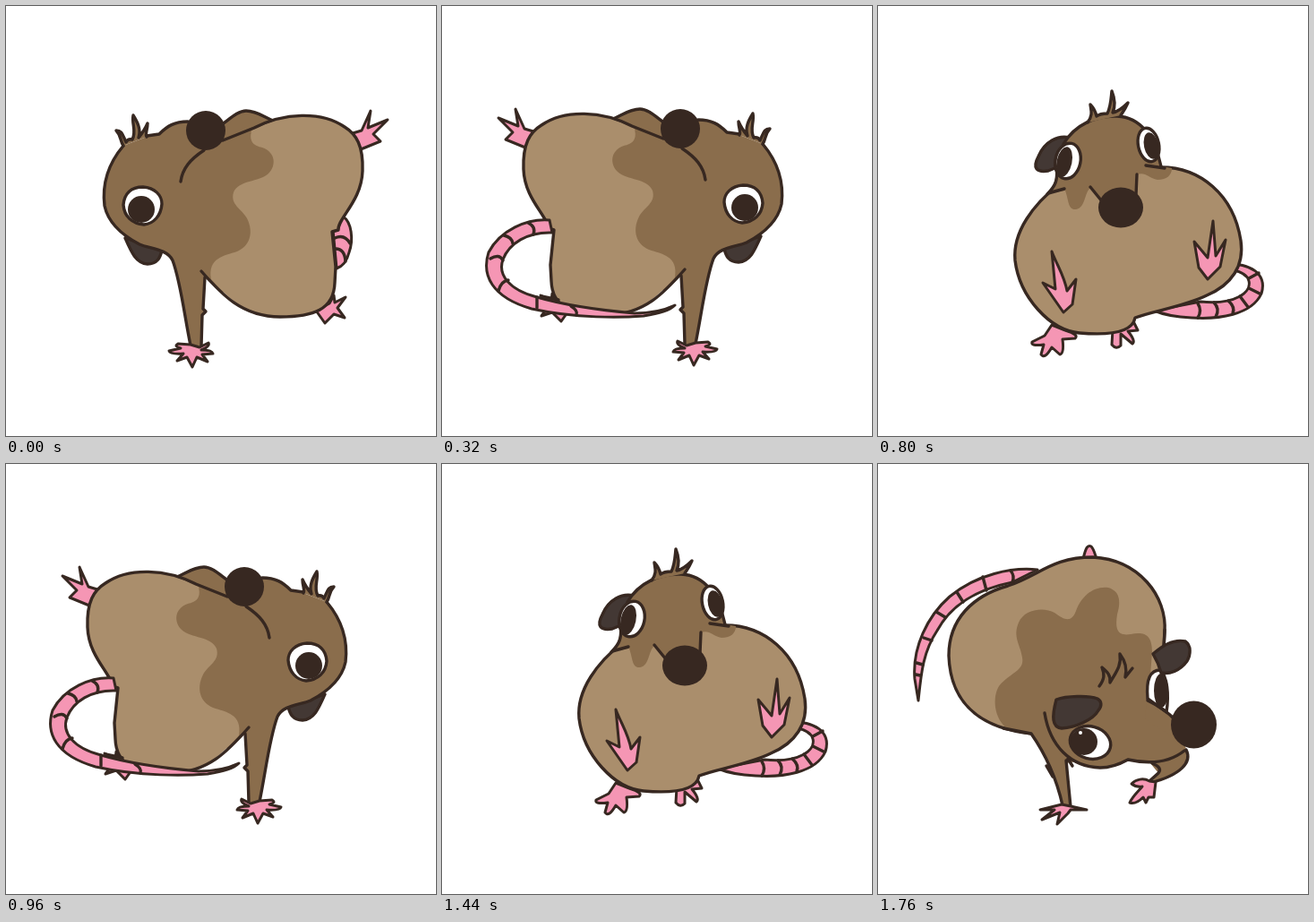
An HTML page that plays this animation: 480 px wide and 480 px high, repeating every 1.92 s.

```html
<!DOCTYPE html>
<html lang="en">
<head>
<meta charset="utf-8">
<title>Spinning rat</title>
<style>
html, body { margin: 0; width: 100%; height: 100%; overflow: hidden; background: #fff; }
svg { display: block; width: 100%; height: 100%; }
.pose { visibility: hidden; }
.line, .fur, .belly, .pink, .ear, .white { stroke: #372821; stroke-width: 3.4; stroke-linejoin: round; stroke-linecap: round; }
.line { fill: none; }
.fur { fill: #8a6d4c; }
.belly { fill: #aa8e6c; }
.pink { fill: #f596b4; stroke-width: 3; }
.ear { fill: #433834; }
.white { fill: #fff; }
.dark { fill: #372821; }
.flat { stroke: none; }
</style>
</head>
<body>
<svg viewBox="0 0 480 480">
<defs>
  <g id="side">
    <path class="pink" d="M387 142L397 139L407 117L404 136L426 127L410 143L418 151L396 160Z"/>
    <path class="pink" d="M346 340L361 332L366 323L367 331L379 325L370 337L378 348L366 344L356 354Z"/>
    <path class="ear" d="M133 259C140 275 145 287 158 288C169 288 172 281 174 273Z"/>
    <path class="fur" d="M240 133C250 126 259 117 268 117C280 117 288 124 298 128L262 152L223 158Z"/>
    <path class="fur flat" d="M131 156C115 175 107 198 110 223C114 242 130 256 149 266C160 271 180 271 186 284C195 308 199 345 206 379L218 380L219 345L223 341L220 338L222 303L240 320L325 300L325 130L245 149L223 139L203 129C188 129 180 134 171 143L157 146Z"/>
    <path class="belly flat" d="M274 139C271 152 277 156 286 158C301 163 302 178 293 187C282 197 260 194 254 208C250 222 263 226 269 237C277 253 272 268 258 274C243 279 225 281 229 305C250 328 270 347 306 347C343 347 366 339 367 309L368 291L364 252L371 250C370 237 397 218 398 184C399 156 391 143 378 135C352 117 310 119 274 139Z"/>
    <path class="line" d="M218 296C240 321 263 347 306 347C343 347 366 339 367 309L368 291L364 252L371 250C370 237 397 218 398 184C399 156 391 143 378 135C352 117 310 119 277 136L242 150"/>
    <path class="line" d="M131 156C115 175 107 198 110 223C114 242 130 256 149 266C160 271 180 271 186 284C195 308 199 345 206 379M222 303L220 338L223 341L219 345L218 380M203 129C188 129 180 134 171 143L157 145M221 161C206 171 197 181 195 196"/>
    <path class="fur" d="M131 156C127 150 129 145 123 139C130 139 130 144 134 152Q136 148 141 149C146 140 140 131 142 122C147 130 151 138 148 147C152 142 155 138 158 131C158 138 155 143 157 146"/>
    <path class="pink" d="M206 378L192 377Q187 380 195 382L182 385Q183 389 198 388L191 396L202 392L208 403L213 392L225 397L219 389L231 388Q230 384 218 384Q228 380 226 376L216 381Z"/>
    <path class="white" d="M131 222C132 210 139 202 153 202C166 203 174 211 174 221C173 234 165 243 154 244C141 243 132 235 131 222Z"/>
    <circle class="dark" cx="151" cy="227" r="15"/>
    <circle class="dark" cx="223" cy="139" r="22"/>
  </g>
</defs>

<g class="pose">
  <path class="pink" d="M376 235C386 241 388 261 383 275C380 287 375 291 369 293L365 250Z"/>
  <path class="line" d="M367 259Q378 254 384 265M368 271Q378 271 379 285"/>
  <use href="#side"/>
</g>

<g class="pose">
  <path class="pink" d="M282 349L262 361L261 378Q266 384 271 379L271 366L284 377Q288 374 279 363L290 362L286 354Z"/>
  <path class="pink" d="M194 356L186 368L172 375Q170 380 185 378L182 389Q186 395 194 381L203 389Q208 388 206 372L220 371Q225 367 209 362Z"/>
  <path class="pink" d="M398 288C425 291 433 305 428 321C417 345 380 350 350 348C330 347 315 343 308 340L360 330C400 334 417 319 414 307C412 299 402 296 396 295Z"/>
  <path class="line" d="M414 304L425 298M414 315L426 321M404 324L413 336M391 329Q399 336 396 343M375 331Q382 338 377 347M357 332Q362 340 357 348"/>
  <path class="ear" d="M214 147C201 144 186 151 179 168C172 181 177 186 190 184L207 177Z"/>
  <path class="belly" d="M202 199C174 221 150 252 153 284C158 325 192 362 225 365C260 368 284 364 287 348C308 340 340 336 367 323C395 311 409 290 405 262C397 210 359 180 316 180Z"/>
  <path class="fur flat" d="M190 209C202 198 198 167 210 149C221 131 244 122 267 123C293 124 308 146 316 179L328 181C328 190 321 194 312 194C302 192 299 185 289 188L288 211L250 218L237 203C230 209 232 225 221 227C212 228 213 217 209 206Z"/>
  <path class="line" d="M189 210C202 197 199 191 200 180M207 154C220 132 244 122 267 123C293 124 309 146 316 179M190 209L208 204M299 178L320 181M237 202L250 218M289 188L288 211"/>
  <path class="fur" d="M234 130C240 122 238 117 237 110C241 114 243 119 244 123Q248 120 256 120C260 112 260 104 261 95C265 105 265 112 262 119C268 118 274 113 279 108C276 115 273 119 271 122"/>
  <ellipse class="white" cx="212" cy="173" rx="14" ry="20" transform="rotate(12 212 173)"/>
  <ellipse class="dark" cx="208" cy="174" rx="8.5" ry="17" transform="rotate(12 208 174)"/>
  <ellipse class="white" cx="302" cy="155" rx="11.5" ry="19" transform="rotate(-12 302 155)"/>
  <ellipse class="dark" cx="305" cy="156" rx="8" ry="15" transform="rotate(-12 305 156)"/>
  <ellipse class="dark" cx="271" cy="225" rx="25" ry="22.5"/>
  <path class="pink" d="M194 274L198 316L184 309L207 342L217 333L221 305L211 318C208 301 200 290 194 274Z"/>
  <path class="pink" d="M374 240L368 281L353 263L358 292L368 305L382 291L388 261L377 279Z"/>
</g>

<g class="pose">
  <use href="#side" transform="matrix(-1 0 0 1 489 -2)"/>
  <path class="pink" d="M120 239C95 237 65 250 52 275C44 300 55 325 100 338C150 349 200 348 225 346C243 343 254 340 260 334C245 341 230 343 215 343C170 339 130 332 106 325C75 317 62 300 68 283C75 265 95 252 123 253Z"/>
  <path class="line" d="M96 242Q105 246 102 255M69 256Q78 258 79 265M54 282Q64 276 68 284M63 318Q66 307 74 306M106 325L106 337M144 335Q152 340 150 345M111 324L130 328"/>
</g>

<g class="pose">
  <path class="pink" d="M229 106C232 93 234 90 238 92C241 95 242 100 244 106Z"/>
  <path class="pink" d="M178 118C150 115 110 123 80 148C55 170 38 205 41 240L45 264C48 235 50 210 66 186C78 164 100 142 150 132Z"/>
  <path class="line" d="M148 119Q153 125 150 132M117 126L121 141M88 143L95 154M65 165L75 171M51 194L60 197M43 222L50 224M42 235L47 236"/>
  <path class="belly" d="M172 301C123 296 81 274 79 214C79 173 106 147 145 136C181 124 194 104 240 104C291 107 323 147 320 188L316 260L200 300Z"/>
  <path class="fur flat" d="M146 297C128 284 128 259 135 248C147 233 164 231 161 216C159 202 150 193 157 177C163 162 185 159 197 166C209 175 216 177 221 164C227 148 240 136 257 138C271 142 271 155 267 168C264 187 269 192 282 190C298 187 306 191 306 210L302 262C318 270 330 280 344 318C351 333 337 346 304 356L313 345L304 334L278 331C260 342 239 341 222 332L210 334L216 383L207 381C199 350 185 321 172 301Z"/>
  <path class="line" d="M140 295L171 301C185 321 199 350 206 381M210 331L215 383M186 278C192 315 215 338 248 339C261 339 270 335 279 330C306 336 327 332 342 320M344 319C351 333 338 347 304 356M306 334Q318 339 313 345L303 354M188 337L195 349M212 329L217 337M320 185L319 205"/>
  <path class="white" d="M315 230C304 230 299 240 301 262L322 277C325 257 323 237 315 230Z"/>
  <ellipse class="dark" cx="316" cy="253" rx="8" ry="19"/>
  <path class="fur flat" d="M300 264L332 286L328 304L298 285Z"/>
  <path class="line" d="M301 264Q320 273 332 286"/>
  <path class="ear" d="M307 212C316 204 330 195 343 198C350 203 349 213 345 220C337 231 325 235 316 233Q313 222 307 212Z"/>
  <ellipse class="white" cx="237" cy="311" rx="23" ry="18" transform="rotate(15 237 311)"/>
  <circle class="dark" cx="230" cy="310" r="15"/>
  <circle class="white flat" cx="226" cy="300" r="2"/>
  <path class="ear" d="M199 263C210 259 235 258 245 262C250 265 250 270 246 275C240 286 220 294 205 295C194 294 194 282 199 263Z"/>
  <ellipse class="dark" cx="352.5" cy="291" rx="25.5" ry="26.5"/>
  <path class="line" d="M247 248C253 240 253 235 250 227C256 232 260 236 259 244C266 232 272 225 270 212C276 220 278 230 276 238L284 228"/>
  <path class="pink" d="M205 380L181 386L197 386L183 397L203 389L200 402L212 390L215 386L233 386L215 382Z"/>
  <path class="pink" d="M303 354C296 350 288 352 283 357Q288 361 295 360C290 366 284 371 281 378C286 380 292 376 296 372L299 378L302 372L308 372L310 355Z"/>
</g>
</svg>
<script>
const poses = document.querySelectorAll(".pose");
const HOLD = 160;

function draw() {
  const current = Math.floor(performance.now() / HOLD) % poses.length;
  poses.forEach((pose, i) => pose.style.visibility = i === current ? "visible" : "hidden");
  requestAnimationFrame(draw);
}
draw();
</script>
</body>
</html>
```
